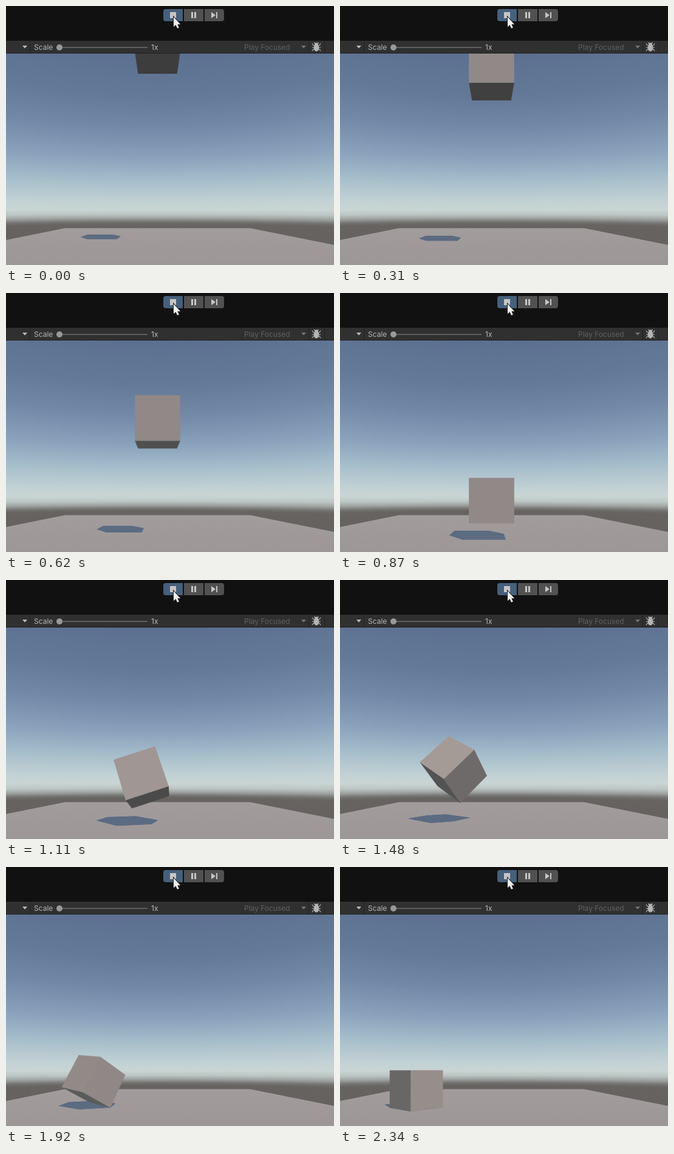
Animation of 540x425 px, one loop 2370 ms. Source, as an HTML page with a canvas:

```html
<!DOCTYPE html>
<html lang="en">
<head>
<meta charset="utf-8">
<title>Falling cube</title>
<style>
  html, body { margin: 0; width: 100%; height: 100%; overflow: hidden; background: #111; }
  canvas { display: block; width: 540px; height: 425px; }
</style>
</head>
<body>
<canvas id="stage" width="540" height="425"></canvas>
<script>
const W = 540, H = 425, VIEW_TOP = 78;
const LOOP = 2370, STEP = 34.35;
const FOCAL = 460, CX = 249.5, CY = 334;
const TO_LIGHT = [0.321, 0.766, -0.557];
const IMPACT = 0.91;

// time, centre x, centre depth, rotation vector
const KEYS = [
  [0,      0,      6.7,   0,     0,     0],
  [IMPACT, 0,      6.7,   0,     0,     0],
  [1.11,  -0.37,   6.82,  0.283, 0.01,  0.328],
  [1.48,  -0.943,  7.12,  0.742, 0,     0.863],
  [1.767, -1.465,  7.5,   1.098, 0.01,  1.276],
  [1.92,  -1.743,  7.705, 0.857, 0.185, 1.22],
  [2.26,  -2.036,  7.576, 0.567, 0.567, 1.495]
];

const SKY = [
  [-310, '#596b8d'], [-256, '#5c6f90'], [-184, '#647998'], [-134, '#7288a7'],
  [-84, '#8aa2bc'], [-44, '#a8bfcc'], [-14, '#c1d1d4'], [0, '#c9d5d4'],
  [8, '#bcc5c3'], [14, '#9ea3a1'], [20, '#737270'], [24, '#666360'], [110, '#615d5a']
];

const dot = (a, b) => a[0] * b[0] + a[1] * b[1] + a[2] * b[2];
const add = (a, b, k = 1) => a.map((v, i) => v + b[i] * k);
const project = ([x, y, z]) => [CX + FOCAL * x / z, CY - FOCAL * y / z];

function polygon(g, points, fill, edge = 0) {
  g.beginPath();
  points.forEach(p => g.lineTo(p[0], p[1]));
  g.closePath();
  g.fillStyle = fill;
  g.fill();
  if (edge) {
    g.strokeStyle = fill;
    g.lineWidth = edge;
    g.stroke();
  }
}

function box(g, x, y, w, h, fill, radii = 0) {
  g.fillStyle = fill;
  g.beginPath();
  g.roundRect(x, y, w, h, radii);
  g.fill();
}

function label(g, text, x, color) {
  g.font = '12px Inter, sans-serif';
  g.fillStyle = color;
  g.fillText(text, x, 72);
}

function drawScene(g) {
  // Bands of equal elevation curve away from the centre of the view.
  for (let x = 0; x < W; x += 2) {
    const k = Math.hypot(1, (x + 1 - CX) / FOCAL);
    const top = CY - 310 * k, bottom = CY + 110 * k;
    const sky = g.createLinearGradient(0, top, 0, bottom);
    SKY.forEach(([y, c]) => sky.addColorStop((y + 310) / 420, c));
    g.fillStyle = sky;
    g.fillRect(x, VIEW_TOP, 2, H - VIEW_TOP);
  }
  const ground = g.createLinearGradient(0, 364, 0, H);
  ground.addColorStop(0, '#a29c9d');
  ground.addColorStop(1, '#9d9697');
  polygon(g, [[-5, -1, 15.1], [5, -1, 15.1], [5, -1, 3], [-5, -1, 3]].map(project), ground);
}

function drawBug(g) {
  g.strokeStyle = g.fillStyle = '#b4b4b4';
  g.lineWidth = 1.2;
  g.beginPath();
  for (const s of [-1, 1]) {
    for (const [y, end] of [[64.5, 61.5], [68, 68], [71, 74]]) {
      g.moveTo(511, y);
      g.lineTo(511 + s * 5, y);
      g.lineTo(511 + s * 7, end);
    }
    g.moveTo(511 + s, 63);
    g.lineTo(511 + s * 3.5, 60);
  }
  g.stroke();
  g.beginPath();
  g.ellipse(511, 68.5, 4.4, 6, 0, 0, Math.PI * 2);
  g.fill();
  g.beginPath();
  g.arc(511, 63, 2.8, 0, Math.PI * 2);
  g.fill();
}

function drawToolbar(g) {
  box(g, 0, 0, W, 57, '#111');
  box(g, 0, 57, W, 20, '#303030');
  box(g, 0, 77, W, 1, '#212121');
  [39, 498, 524].forEach(x => box(g, x, 57, 1, 20, '#222'));
  box(g, 388, 57, 1, 20, '#2a2a2a');

  polygon(g, [[27, 65], [35, 65], [31, 69.5]], '#bdbdbd');
  polygon(g, [[486, 65], [494, 65], [490, 69.5]], '#747474');
  label(g, 'Scale', 46, '#b4b4b4');
  label(g, '1x', 239, '#bcbcbc');
  label(g, 'Play Focused', 392, '#606060');
  box(g, 88, 67, 145, 2, '#5e5e5e');
  box(g, 83, 63, 10, 10, '#999', 5);
  drawBug(g);

  box(g, 259, 5, 32, 20, '#46607c', [4, 0, 0, 4]);
  box(g, 293, 5, 32, 20, '#515151');
  box(g, 327, 5, 32, 20, '#515151', [0, 4, 4, 0]);
  const icon = '#c6c6c6';
  box(g, 270, 10, 10, 10, icon);
  box(g, 305, 10, 3, 10, icon);
  box(g, 310, 10, 3, 10, icon);
  polygon(g, [[338, 10], [345, 15], [338, 20]], icon);
  box(g, 346, 10, 2, 10, icon);

  const cursor = [[276, 18], [276, 34], [279.5, 31], [282, 36.6],
                  [284.8, 35.4], [282.4, 30], [287, 30]];
  polygon(g, cursor, '#1a1a1a', 2);
  polygon(g, cursor, '#f0f0f0');
}

// Turns a rotation vector into the cube's three unit axes.
function axesFrom(v) {
  const angle = Math.hypot(...v);
  if (angle < 1e-6) return [[1, 0, 0], [0, 1, 0], [0, 0, 1]];
  const [x, y, z] = v.map(n => n / angle);
  const c = Math.cos(angle), s = Math.sin(angle), d = 1 - c;
  return [
    [c + x * x * d, x * y * d + z * s, x * z * d - y * s],
    [x * y * d - z * s, c + y * y * d, y * z * d + x * s],
    [x * z * d + y * s, y * z * d - x * s, c + z * z * d]
  ];
}

function poseAt(t) {
  let i = KEYS.findIndex(k => k[0] > t);
  if (i < 0) i = KEYS.length;
  const from = KEYS[i - 1], to = KEYS[Math.min(i, KEYS.length - 1)];
  let q = from === to ? 0 : (t - from[0]) / (to[0] - from[0]);
  if (i === KEYS.length - 1) q = (q + q * q) / 2;
  const [, x, z, ...turn] = from.map((v, n) => v + (to[n] - v) * q);
  const axes = axesFrom(turn);
  const b = t - IMPACT;
  const flight = b < 0 ? 4.995 - 0.758 * t - 4.61 * t * t : 0.5 + 4.02 * b - 4.39 * b * b;
  const resting = axes.reduce((sum, a) => sum + Math.abs(a[1]) / 2, 0);
  return { axes, center: [x, Math.max(flight, resting) - 1, z] };
}

function facesOf({ axes, center }) {
  const faces = [];
  for (let i = 0; i < 3; i++) {
    const side = axes[(i + 1) % 3], up = axes[(i + 2) % 3];
    for (const s of [-1, 1]) {
      const normal = axes[i].map(v => v * s);
      const middle = add(center, normal, 0.5);
      const corners = [[-1, -1], [1, -1], [1, 1], [-1, 1]]
        .map(([a, b]) => add(add(middle, side, a / 2), up, b / 2));
      faces.push({ normal, middle, corners });
    }
  }
  return faces;
}

function shade(normal, facing) {
  const d = dot(normal, TO_LIGHT);
  const lum = d > 0 ? 78 + 132 * d - 40 * d * d : 58 + 75 * Math.exp(-facing / 0.15);
  const warm = Math.max(0, d);
  return `rgb(${lum + 10 * warm}, ${lum - 3 * warm}, ${lum - 8 * warm})`;
}

const castShadow = ([x, y, z]) => [x - 0.419 * (y + 1), -1, z + 0.727 * (y + 1)];

function drawCube(g, t) {
  const faces = facesOf(poseAt(t));
  for (const f of faces) {
    polygon(g, f.corners.map(p => project(castShadow(p))), 'rgb(91, 107, 129)');
  }
  for (const f of faces) {
    const facing = -dot(f.normal, f.middle) / Math.hypot(...f.middle);
    if (facing > 0) polygon(g, f.corners.map(project), shade(f.normal, facing), 0.5);
  }
}

const ctx = document.getElementById('stage').getContext('2d');
const scene = document.createElement('canvas');
scene.width = W;
scene.height = H;
drawScene(scene.getContext('2d'));

const start = performance.now();
function frame() {
  const elapsed = (performance.now() - start) % LOOP;
  const t = (Math.floor(elapsed / STEP + 0.15) * STEP + 4) / 1000;
  ctx.drawImage(scene, 0, 0);
  drawCube(ctx, t);
  drawToolbar(ctx);
  requestAnimationFrame(frame);
}
frame();
</script>
</body>
</html>
```
